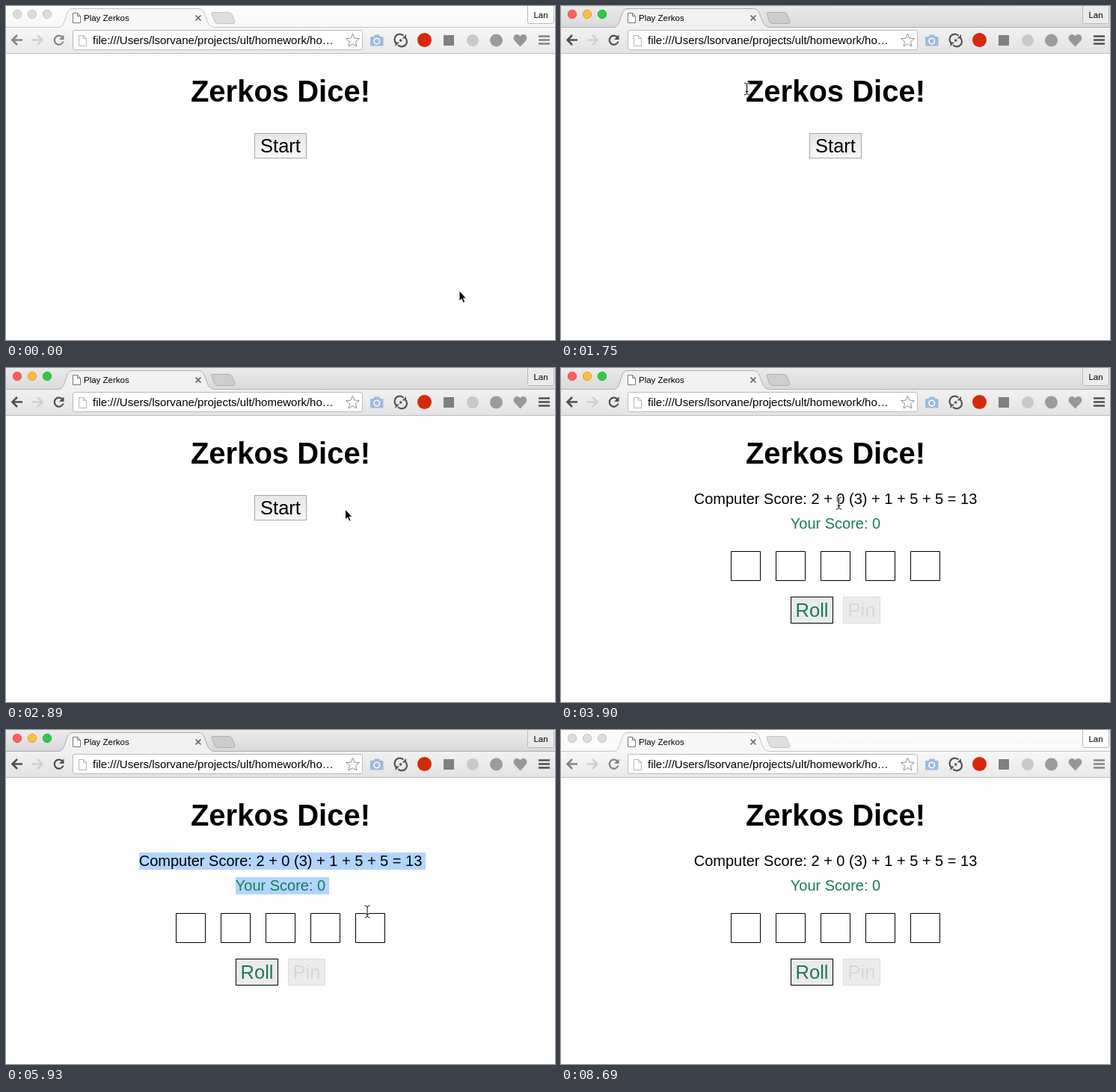
Write an HTML page that moves like this. It is 734 px wide and 447 px high and loops after 8790 ms.

```html
<!DOCTYPE html>
<html lang="en">
<head>
<meta charset="utf-8">
<title>Dice game</title>
<style>
html, body { margin: 0; width: 734px; height: 447px; overflow: hidden; background: #fefefe; }
svg {
  display: block;
  font-family: "Liberation Sans", Arial, sans-serif;
  --strip1: #ebebeb; --strip2: #d9d9d9; --bar1: #f1f1f1; --bar2: #e3e3e3;
  --line: #adadad; --icon: #505050; --user: #ebebeb; --newTab: #cecece;
}
svg.idle {
  --strip1: #fdfdfd; --strip2: #f8f8f8; --bar1: #f7f7f7; --bar2: #e9e9e9;
  --line: #c4c4c4; --icon: #858585; --user: #fefefe; --newTab: #dedede;
}
.idle .light { fill: #dcdcdc; stroke: #c6c6c6; }
.line { fill: none; stroke: var(--line); }
.icon { fill: none; stroke: var(--icon); stroke-width: 2.6; }
.small { font-size: 11.5px; }
.mid { text-anchor: middle; }
.score { font-size: 20px; }
.label { font-size: 25.5px; }
.green { fill: #1b7a57; }
.sel { fill: #b2d5fd; }
.page { fill: #fff; stroke: #777; }
</style>
</head>
<body>
<svg id="stage" width="734" height="447" viewBox="0 0 734 447">
  <defs>
    <linearGradient id="strip" x2="0" y2="1">
      <stop style="stop-color:var(--strip1)"/><stop offset="1" style="stop-color:var(--strip2)"/>
    </linearGradient>
    <linearGradient id="bar" x2="0" y2="1">
      <stop style="stop-color:var(--bar1)"/><stop offset="1" style="stop-color:var(--bar2)"/>
    </linearGradient>
    <linearGradient id="face" x2="0" y2="1">
      <stop stop-color="#e6e6e6"/><stop offset="1" stop-color="#f8f8f8"/>
    </linearGradient>
    <path id="ibeam" d="M-3.5 -8Q-.5 -8 0 -6Q.5 -8 3.5 -8M0 -6V6M-3.5 8Q-.5 8 0 6Q.5 8 3.5 8M-2 3.5H2"/>
  </defs>

  <!-- Tab strip -->
  <rect width="734" height="29" fill="url(#strip)"/>
  <rect y="29" width="734" height="35" fill="url(#bar)"/>
  <path d="M0 63.5H734" stroke="#bdbdbd"/>
  <circle class="light" cx="15" cy="11" r="5.7" fill="#fc615c" stroke="#e2504b"/>
  <circle class="light" cx="35" cy="11" r="5.7" fill="#fdbd40" stroke="#dfa133"/>
  <circle class="light" cx="55" cy="11" r="5.7" fill="#34c84a" stroke="#2aad3b"/>
  <path d="M277 8.5H297Q301 8.5 302 11L306 21Q306.5 23.5 303 23.5H284Q280 23.5 279 21L275 11Q274 8.5 277 8.5Z" style="fill:var(--newTab);stroke:var(--line)"/>
  <path d="M70 29C76 28 77 24 79 18L82 9Q84 3.5 89 3.5H257Q263 3.5 265 9L269 20Q271 27 278 29Z" style="fill:var(--bar1)"/>
  <path class="line" d="M0 28.5H70C76 28 77 24 79 18L82 9Q84 3.5 89 3.5H257Q263 3.5 265 9L269 20Q271 27 278 28.5H734"/>
  <path class="page" d="M89.5 9.5H95.5L99.5 13.5V22.5H89.5ZM95.5 9.5V13.5H99.5"/>
  <text class="small" x="104" y="20">Play Zerkos</text>
  <path d="M253.5 12.5L260.5 19.5M260.5 12.5L253.5 19.5" stroke="#666" stroke-width="1.7"/>
  <rect x="697.5" y="-3.5" width="35" height="27" rx="2" style="fill:var(--user)" stroke="#b9b9b9"/>
  <text class="small mid" x="715" y="16">Lan</text>

  <!-- Toolbar -->
  <path class="icon" d="M22 45.5H9M15 39L8.5 45.5L15 52"/>
  <path class="icon" d="M35 45.5H48M42 39L48.5 45.5L42 52" style="stroke:#cfcfcf"/>
  <path class="icon" d="M75.5 42A6 6 0 1 0 76.5 47.5" style="stroke-width:2.2"/>
  <path d="M77.5 38.5V45H71Z" style="fill:var(--icon)"/>
  <rect x="89.5" y="32.5" width="387" height="26" rx="2.5" fill="#fff" stroke="#bababa"/>
  <path class="page" d="M97.5 39.5H103.5L107.5 43.5V53.5H97.5ZM103.5 39.5V43.5H107.5" style="stroke:#b5b5b5"/>
  <text x="116" y="51" font-size="15">file:///Users/lsorvane/projects/ult/homework/ho…</text>
  <path id="star" fill="#fff" stroke="#8e8e8e" stroke-linejoin="round"/>
  <path d="M488 41H491.5L493 38.5H499L500.5 41H503Q504.5 41 504.5 42.5V52Q504.5 53.5 503 53.5H489Q487 53.5 487 52V42.5Q487 41 488 41Z" fill="#9dbbdc"/>
  <circle cx="495.7" cy="47" r="3.8" fill="#9dbbdc" stroke="#fff" stroke-width="1.6"/>
  <path d="M521.5 49.5A7 7 0 0 1 531.5 39.7M534 42.5A7 7 0 0 1 524 52.3" fill="none" stroke="#555" stroke-width="2.2"/>
  <path d="M529.5 43.5L535 43.5L535 38ZM526 48.5L520.5 48.5L520.5 54Z" fill="#555"/>
  <circle cx="527.7" cy="46" r="1.8" fill="#555"/>
  <circle cx="559.5" cy="45.5" r="9.5" fill="#d5290d"/>
  <rect x="585" y="39" width="14" height="14" fill="#808080"/>
  <circle cx="624" cy="46" r="8" fill="#c9c9c9"/>
  <circle cx="655.5" cy="46" r="8.5" fill="#9c9c9c"/>
  <path d="M687.5 54.5L680 46.5C675.5 41 683 34.5 687.5 40.5C692 34.5 699.5 41 695 46.5Z" fill="#979797"/>
  <path class="icon" d="M712 40.5H727M712 45.5H727M712 50.5H727"/>

  <!-- Page -->
  <rect id="selTitle" class="sel" x="247" y="91" height="46"/>
  <text class="mid" x="367" y="128" font-size="40" font-weight="bold">Zerkos Dice!</text>

  <g id="intro">
    <rect id="startFace" x="332.5" y="170.5" width="69" height="33" fill="url(#face)" stroke="#a6a6a6"/>
    <rect id="selStart" class="sel" x="340" y="172" height="29"/>
    <text class="mid label" x="367" y="196">Start</text>
  </g>

  <g id="game">
    <rect id="selComputer" class="sel" x="178" y="164" height="23"/>
    <rect id="selYours" class="sel" x="307" y="197" height="23"/>
    <text class="mid score" x="367" y="182">Computer Score: 2 + 0 (3) + 1 + 5 + 5 = 13</text>
    <text class="mid score green" x="367" y="215">Your Score: 0</text>
    <path d="M227.5 245.5h39v39h-39zm60 0h39v39h-39zm60 0h39v39h-39zm60 0h39v39h-39zm60 0h39v39h-39z" fill="#fff" stroke="#000"/>
    <rect x="307.5" y="306.5" width="56" height="35" fill="#ebebeb" stroke="#000"/>
    <text class="mid label green" x="335.5" y="333">Roll</text>
    <rect x="377.5" y="306.5" width="49" height="35" fill="#ebebeb" stroke="#dcdcdc"/>
    <text class="mid label" x="402" y="333" fill="#d8d8d8">Pin</text>
  </g>

  <path id="arrow" d="M.5 0V14L3.7 11L5.8 16.3L8.2 15.2L6 10.2H10Z" stroke="#fff"/>
  <g id="beam" fill="none">
    <use href="#ibeam" stroke="#fff" stroke-width="2.5"/>
    <use href="#ibeam" stroke="#000"/>
  </g>
</svg>
<script>
const LOOP = 8790;
const $ = id => document.getElementById(id);

// start, end, steps, from, control point, to, uses the text cursor
const moves = [
  [0, 0, 1, [605.5, 381], [605.5, 381], [605.5, 381], () => false],
  [890, 1510, 12, [605.5, 381], [427, 246], [248.5, 111], y => y < 137],
  [1750, 2240, 10, [248.5, 111], [352, 151], [455, 191.5], () => true],
  [2420, 2480, 2, [452, 183], [452, 186], [453, 189], () => false],
  [3190, 3430, 5, [453, 189], [411, 185], [370, 180], () => false],
  [3900, 3900, 1, [371.5, 181], [371.5, 181], [371.5, 181], () => true],
  [4500, 5350, 15, [371.5, 181], [235, 88], [181, 149], y => y > 164],
  [5440, 5930, 10, [181, 149], [332, 196], [483, 243], () => true],
  [7010, 7520, 10, [483, 243], [610, 345], [724, 450], y => y < 244]
];

function cursorAt(t) {
  const [start, end, steps, from, mid, to, isBeam] = moves.filter(m => m[0] <= t).pop();
  const u = end > start ? Math.min(1, (t - start) / (end - start)) : 1;
  const p = steps > 1 ? Math.floor(u * (steps - 1) + 1e-6) / (steps - 1) : 1;
  const e = p * p * (3 - 2 * p), r = 1 - e;
  const [x, y] = from.map((v, i) => r * r * v + 2 * r * e * mid[i] + e * e * to[i]);
  return { x, y, beam: isBeam(y) };
}

const show = (id, on) => $(id).style.display = on ? "" : "none";

// Highlights a line up to the cursor, or whole once the cursor is below it
function select(id, on, x, whole, right) {
  const width = (whole ? right : Math.min(x, right)) - $(id).getAttribute("x");
  $(id).setAttribute("width", on && width > 6 ? width : 0);
}

function draw(t) {
  const { x, y, beam } = cursorAt(t);
  const playing = t >= 3815;
  $("stage").classList.toggle("idle", t < 620 || t >= 8690);
  show("intro", !playing);
  show("game", playing);
  $("startFace").setAttribute("fill", t >= 3730 ? "#d4d4d4" : "url(#face)");

  const first = t >= 1750 && t < 2890;
  select("selTitle", first, x, y > 140, 498);
  select("selStart", first && y > 172, x, false, 394);
  const second = t >= 5440 && t < 6710;
  select("selComputer", second, x, y > 190, 561);
  select("selYours", second && y > 190, x, y > 224, 432);

  for (const [id, on] of [["arrow", !beam], ["beam", beam]]) {
    show(id, on && t < 7520);
    $(id).setAttribute("transform", `translate(${x} ${y})`);
  }
}

const ray = (_, i) => {
  const r = i % 2 ? 4.2 : 9.3, a = i * Math.PI / 5 - Math.PI / 2;
  return `${463.5 + r * Math.cos(a)} ${46.5 + r * Math.sin(a)}`;
};
$("star").setAttribute("d", "M" + Array.from({ length: 10 }, ray).join("L") + "Z");

const origin = performance.now();
function tick() {
  draw((performance.now() - origin) % LOOP);
  requestAnimationFrame(tick);
}
tick();
</script>
</body>
</html>
```
